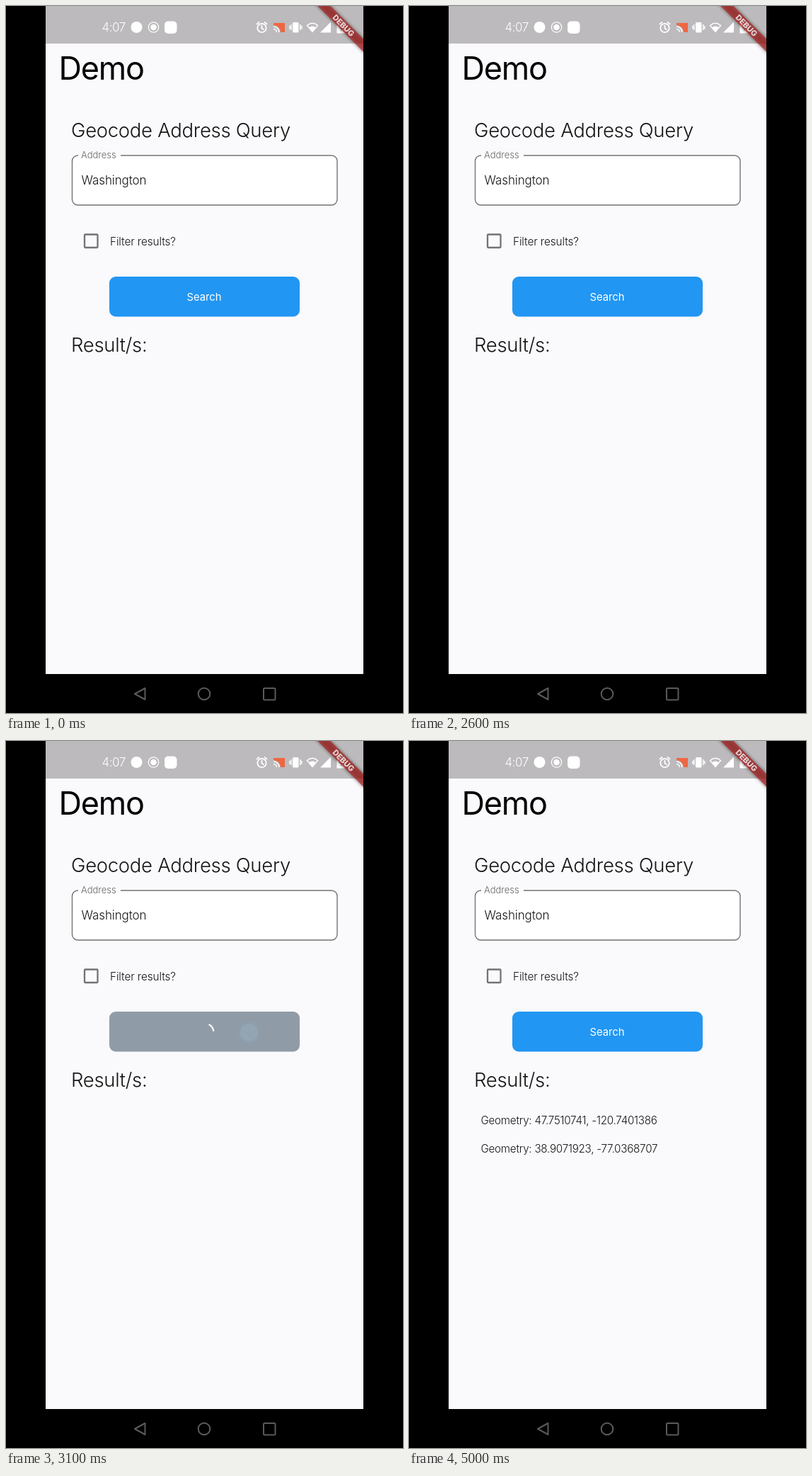
Animation of 561x998 px, one loop 5500 ms. Source, as an HTML page:

```html
<!DOCTYPE html>
<html lang="en">
<head>
<meta charset="utf-8">
<title>Geocode demo</title>
<style>
html, body { margin: 0; width: 100%; height: 100%; overflow: hidden; background: #000; }
svg { display: block; width: 100vw; height: 100vh; }
text { font-family: Inter, "Liberation Sans", sans-serif; font-weight: 300; fill: #151515; }
.line { fill: none; stroke: #fff; }
.nav { fill: none; stroke: #5a5a5a; stroke-width: 2; stroke-linejoin: round; }
.h { font-size: 27.5px; letter-spacing: -.3px; }
.geo { font-size: 15.2px; letter-spacing: -.25px; }
</style>
</head>
<body>
<svg viewBox="0 0 561 998">
  <defs>
    <clipPath id="screen"><path d="M56 0H505V943H56z"/></clipPath>
    <filter id="soft" x="-50%" y="-50%" width="200%" height="200%"><feGaussianBlur stdDeviation="2.5"/></filter>
    <radialGradient id="dot">
      <stop offset="0" stop-color="#a3d3f8"/>
      <stop offset=".6" stop-color="#b2d9f5"/>
      <stop offset=".72" stop-color="#c6e0f2"/>
      <stop offset=".78" stop-color="#7fc1f6" stop-opacity=".7"/>
      <stop offset="1" stop-color="#7fc1f6" stop-opacity="0"/>
    </radialGradient>
  </defs>
  <path d="M56 0H505V943H56z" fill="#faf9fc"/>
  <path d="M56 0H505V53H56z" fill="#bcbabc"/>

  <!-- status bar -->
  <text x="135.5" y="36" font-size="17" letter-spacing="-.5" style="fill:#fff">4:07</text>
  <g fill="#fff">
    <circle cx="184.5" cy="30" r="8"/>
    <circle cx="208.5" cy="30" r="4.3"/>
    <circle class="line" cx="208.5" cy="30" r="7.2" stroke-width="1.3"/>
    <rect x="224" y="21.500" width="17.500" height="17.500" rx="5"/>
    <g class="line" stroke-width="1.8">
      <circle cx="361.500" cy="31" r="6.200"/>
      <path d="M361.500 27v4.500l3 2M354 26l4-3.500M369 26l-4-3.500"/>
    </g>
    <path d="M378 24H394V37H388A10 10 0 0 0 378 27z" fill="#ee6742"/>
    <path class="line" d="M378 29a8 8 0 0 1 8 8M378 32.500a4.500 4.500 0 0 1 4.500 4.500" stroke-width="1.500"/>
    <rect x="405" y="23" width="8.500" height="14.500" rx="1.500"/>
    <path class="line" d="M402.800 26v8M415.800 26v8M400.800 28v4.500M417.800 28v4.500" stroke-width="1.500"/>
    <path class="line" d="M425.500 27.500Q433 21 440.500 27.500L433 36.500z" stroke-width="1.400"/>
    <path d="M428 30.500Q433 26.500 438 30.500L433 37z"/>
    <path d="M459 22.500V37.500H444z"/>
    <path d="M467.500 24h3.500v-2h4.500v2h3.500V38.500H467.500z"/>
    <path d="M474.500 25.500l-4 6h2.500v4.500l4-6h-2.500z" fill="#aaa"/>
  </g>

  <!-- debug ribbon -->
  <g clip-path="url(#screen)">
    <g transform="translate(477 27.500) rotate(45)">
      <path d="M-80 -6.500H80V6.500H-80z" opacity=".48" filter="url(#soft)"/>
      <path d="M-80 -6.500H80V6.500H-80z" fill="#b71c1c" opacity=".63"/>
      <text y="4" font-size="11" text-anchor="middle" style="font-weight:800;fill:#e6d6d7">DEBUG</text>
    </g>
  </g>

  <!-- form -->
  <text x="74.500" y="103.500" font-size="45" letter-spacing="-1.200" style="font-weight:400;fill:#000">Demo</text>
  <text class="h" x="92" y="184.500">Geocode Address Query</text>
  <rect x="93.500" y="211" width="374.500" height="70" rx="8" fill="#fff" stroke="#747474" stroke-width="1.400"/>
  <path d="M102 208H162V214H102z" fill="#fcfbfd"/>
  <text x="106" y="215" font-size="13" style="fill:#666">Address</text>
  <text x="106.500" y="252" font-size="17" letter-spacing="-.1">Washington</text>
  <rect x="111" y="322.500" width="18.500" height="18.500" rx="1" fill="none" stroke="#737373" stroke-width="2.300"/>
  <text x="147" y="338" font-size="15.300" letter-spacing="-.1">Filter results?</text>
  <rect id="button" x="146" y="382" width="269" height="56.500" rx="9"/>
  <text id="label" x="280" y="416" font-size="14.800" text-anchor="middle" style="font-weight:400;fill:#fff">Search</text>
  <path id="spinner" class="line" stroke-width="2.200"/>
  <circle id="touch" cx="343.500" cy="411.500" r="16" fill="url(#dot)"/>
  <text class="h" x="92" y="488">Result/s:</text>
  <g id="results" class="geo">
    <text x="101.500" y="540.500">Geometry: 47.7510741, -120.7401386</text>
    <text x="101.500" y="580.500">Geometry: 38.9071923, -77.0368707</text>
  </g>

  <!-- navigation -->
  <g class="nav">
    <path d="M182 971L196.500 963V979z"/>
    <circle cx="280" cy="971" r="8.300"/>
    <rect x="364" y="963" width="16.500" height="16.500" rx="1.500"/>
  </g>
</svg>
<script>
const LOOP = 5500, PRESS = 2900, BUSY = 3100, DONE = 3200;
const el = id => document.getElementById(id);
const show = (id, on) => el(id).setAttribute('visibility', on ? 'visible' : 'hidden');

function arc(cx, cy, r, from, to) {
  const at = deg => {
    const a = deg * Math.PI / 180;
    return `${cx + r * Math.cos(a)} ${cy + r * Math.sin(a)}`;
  };
  return `M${at(from)}A${r} ${r} 0 0 1 ${at(to)}`;
}
el('spinner').setAttribute('d', arc(280.5, 411.5, 13, -62, -8));

function draw(now) {
  const t = now % LOOP;
  const busy = t >= BUSY && t < DONE;
  el('button').setAttribute('fill', busy ? '#8f9ca8' : '#2196f3');
  show('label', !busy);
  show('spinner', busy);
  show('touch', t >= PRESS && t < DONE);
  el('touch').setAttribute('opacity', busy ? .14 : 1);
  show('results', t >= DONE);
  requestAnimationFrame(draw);
}
draw(0);
</script>
</body>
</html>
```
